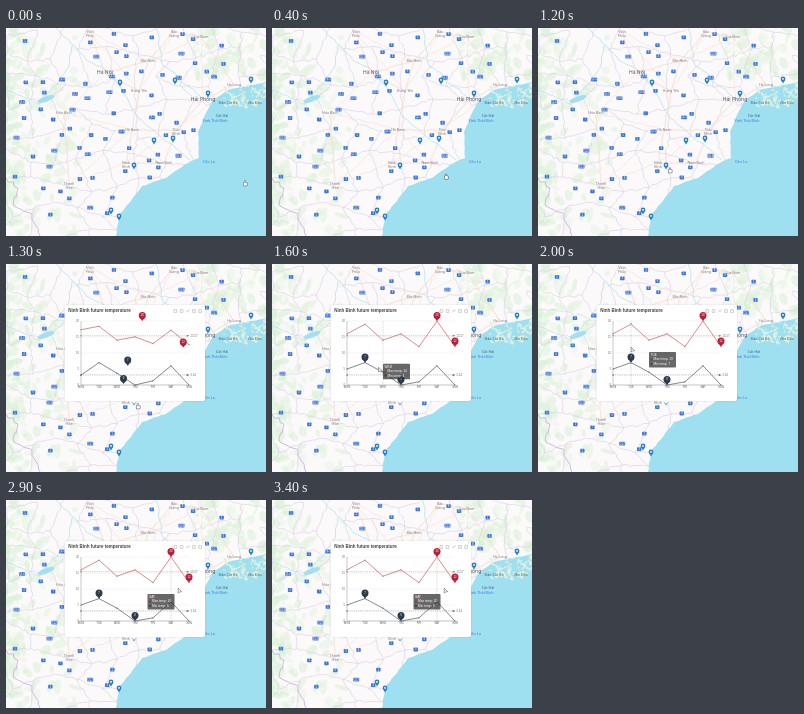
An HTML page with a canvas that plays this animation: 260x208 px, repeating every 3500 ms.

```html
<!DOCTYPE html>
<html lang="en">
<head>
<meta charset="utf-8">
<title>Temperature map</title>
<style>
html, body { margin: 0; width: 100%; height: 100%; overflow: hidden; background: #fff; }
canvas { display: block; width: 260px; height: 208px; }
</style>
</head>
<body>
<canvas id="stage"></canvas>
<script>
const W = 260, H = 208, LOOP = 3500, TICK = 100;
const OPEN = 1205, HOVER = 1500;
const FONT = '"Liberation Sans", Arial, sans-serif';
const MAP_FONT = '"Noto Sans", "Open Sans", sans-serif';
const RED = '#b9203a', DARK = '#2c3c4c';
const ratio = Math.max(1, window.devicePixelRatio || 1);

const sized = c => {
  c.width = W * ratio;
  c.height = H * ratio;
  const g = c.getContext('2d');
  g.scale(ratio, ratio);
  g.lineJoin = 'round';
  return g;
};
const ctx = sized(document.getElementById('stage'));
const mapCanvas = document.createElement('canvas');

let seed = 4711;
const rnd = () => (seed = (seed * 16807) % 2147483647) / 2147483647;
const spread = n => (rnd() - .5) * n;
const mix = (a, b, f) => a + (b - a) * f;
const clamp = v => Math.max(0, Math.min(1, v));

function trace(g, pts) {
  g.beginPath();
  pts.forEach(([x, y]) => g.lineTo(x, y));
}

function stroke(g, pts, color, width, dash = []) {
  trace(g, pts);
  g.strokeStyle = color;
  g.lineWidth = width;
  g.setLineDash(dash);
  g.stroke();
  g.setLineDash([]);
}

function fill(g, pts, color) {
  trace(g, pts);
  g.fillStyle = color;
  g.fill();
}

function oval(g, x, y, rx, ry, color, turn = 0) {
  g.beginPath();
  g.ellipse(x, y, rx, ry, turn, 0, 7);
  g.fillStyle = color;
  g.fill();
}
const disc = (g, x, y, r, color) => oval(g, x, y, r, r, color);

function box(g, x, y, w, h, r, color) {
  g.beginPath();
  g.roundRect(x, y, w, h, r);
  g.fillStyle = color;
  g.fill();
}

function text(g, str, x, y, size, color, align = 'left', font = FONT, weight = 400) {
  g.font = `${weight} ${size}px ${font}`;
  g.textAlign = align;
  g.textBaseline = 'middle';
  g.fillStyle = color;
  g.fillText(str, x, y);
}

// Adds jagged detail between the given points
function wander(pts, amount) {
  return pts.flatMap(([x, y], i) => {
    const [ex, ey] = pts[i + 1] || [x, y];
    const n = Math.max(1, Math.round(Math.hypot(ex - x, ey - y) / 4));
    return Array.from({ length: n }, (_, k) => [
      mix(x, ex, k / n) + (k ? spread(amount) : 0),
      mix(y, ey, k / n) + (k ? spread(amount) : 0)
    ]);
  });
}

const PLACES = [
  ['Hà Nội', 99, 45, 5], ['Hải Phòng', 197, 72, 5], ['Vĩnh|Phúc', 84, 4], ['Bắc|Giang', 168, 4],
  ['Lục Nam', 195, 9], ['Bắc Ninh', 142, 33], ['Hưng Yên', 133, 63], ['Hòa Bình', 58, 85],
  ['Hà Nam', 126, 102], ['Thái|Bình', 170, 102], ['Nam Định', 158, 135], ['Ninh|Bình', 120, 135],
  ['Thanh|Hóa', 63, 156], ['Hạ Long', 228, 57]
];
const SEA_LABELS = [['Đảo Cát Bà', 222, 75, '#46627c'], ['Vân Đồn', 249, 75, '#46627c'],
  ['Cát Hải', 216, 88, '#46627c'], ['Vịnh Thái Bình', 209, 93, '#3f7be0'], ['Cồn Lu', 203, 134, '#3f7be0']];
const PINS = [[245, 52], [169, 53], [202, 66], [114, 55], [148, 113], [167, 111], [128, 138], [105, 183], [113, 189]];
const COAST = [[260, 54], [222, 62], [208, 71], [199, 87], [192, 104], [193, 130], [178, 137],
  [160, 150], [136, 158], [125, 173], [113, 187], [110, 208]];

function mapPin(g, x, y) {
  fill(g, [[x - 2.1, y], [x + 2.1, y], [x, y + 3.6]], '#2a81c4');
  disc(g, x, y - 1.1, 2.4, '#2a81c4');
  disc(g, x, y - 1.1, .9, '#fff');
}

function shield(g, x, y) {
  const wide = rnd() < .3, w = wide ? 6 : 4.4;
  box(g, x - w / 2, y - 1.9, w, 3.8, .7, '#3f76dc');
  text(g, (wide ? 'QL' : '') + Math.ceil(rnd() * 9), x, y + .2, 2.8, '#fff', 'center');
}

function label(g, str, x, y, size, color) {
  str.split('|').forEach((line, i) => text(g, line, x, y + i * (size + .4), size, color, 'center', MAP_FONT));
}

function borders(g) {
  const step = 26, node = (c, r) => [c * step + Math.sin(c * 7 + r * 3) * 8, r * step + Math.cos(c * 5 + r * 8) * 8];
  for (let c = 0; c <= 10; c++) {
    for (let r = 0; r <= 8; r++) {
      [[c + 1, r], [c, r + 1]].forEach(([a, b]) => {
        if (rnd() < .75) stroke(g, wander([node(c, r), node(a, b)], 3), '#d3cfe2', .6);
      });
    }
  }
}

// Each town is joined to its nearest neighbours
function roads(g) {
  PLACES.forEach(([, x, y]) => {
    PLACES.map(([, a, b]) => [a, b, Math.hypot(a - x, b - y)])
      .sort((p, q) => p[2] - q[2]).slice(1, 4)
      .forEach(([a, b]) => stroke(g, wander([[x, y], [a, b]], 2), '#f5dfd2', .6));
  });
}

function drawMap(g) {
  g.fillStyle = '#fcf9fa';
  g.fillRect(0, 0, W, H);
  for (let i = 0; i < 330; i++) {
    const west = i < 250, f = rnd();
    const x = west ? f * f * 78 : 185 + f * 75, y = rnd() * (west ? H : 50);
    g.globalAlpha = .25 + rnd() * .4;
    oval(g, x, y, 2 + rnd() * 6, 1.5 + rnd() * 4, rnd() < .7 ? '#d8f1d6' : '#fbfcf8', rnd() * 3);
  }
  g.globalAlpha = 1;

  borders(g);
  roads(g);
  stroke(g, wander([[0, 150], [12, 160], [8, 178], [26, 186], [34, 208]], 4), '#c9b5dc', .9);
  [[[50, 0], [84, 34], [106, 46], [132, 90], [184, 132]], [[150, 0], [156, 35], [205, 78]], [[0, 62], [34, 76], [62, 40], [66, 18]]]
    .forEach(r => stroke(g, wander(r, 2.5), '#b5e2f2', .8));
  oval(g, 40, 71, 9, 2.6, '#a5def1', -.35);

  const coast = wander(COAST, 1);
  fill(g, [...coast, [W, H]], '#9edff0');
  for (let i = 0; i < 60; i++) {
    oval(g, 218 + rnd() * 42, 57 + rnd() * 22, .6 + rnd() * 2.4, .5 + rnd() * 1.5, '#dcefe0', rnd() * 3);
  }

  // Route shields on a loose grid, on land only
  for (let x = 14; x < 215; x += 18) {
    for (let y = 12; y < 200; y += 19) {
      const sx = x + spread(14), sy = y + spread(14);
      trace(g, [...coast, [W, H]]);
      const wet = g.isPointInPath((sx + 4) * ratio, (sy + 3) * ratio);
      if (!wet && rnd() < (x < 50 ? .4 : .75)) shield(g, sx, sy);
    }
  }

  PLACES.forEach(([s, x, y, big]) => label(g, s, x, y, big || 3.6, big ? '#504d58' : '#807b86'));
  SEA_LABELS.forEach(([s, x, y, color]) => label(g, s, x, y, 3.7, color));
  PINS.forEach(([x, y]) => mapPin(g, x, y));
}
drawMap(sized(mapCanvas));

const DAYS = ['MON', 'TUE', 'WED', 'THU', 'FRI', 'SAT', 'SUN'];
// Pins run from [day, value] to [day, value]
const SERIES = [
  { name: 'Max', line: '#c4615f', pin: RED, mean: '15.57', meanAt: 15.4,
    from: [20, 17, 14, 13, 15, 11, 14], to: [16, 19, 14, 16, 12, 20, 12],
    pins: [[0, 20, 5, 20], [5, 11, 6, 12]] },
  { name: 'Min', line: '#4d5861', pin: DARK, mean: '3.14', meanAt: 3.14,
    from: [-1, 7, 3, 0, 2, 6, 0], to: [5, 7, 4, 0, 1, 6, 0],
    pins: [[6, 4, 1, 7], [1, 1, 3, 0]] }
];
const px = day => 75 + day * 18;
const py = v => 121 - v * 3.2;

// Rows are [time, x, y]
function along(keys, t) {
  const n = keys.findIndex(k => k[0] > t);
  if (n < 1) return keys.at(n).slice(1);
  const a = keys[n - 1], b = keys[n], f = (t - a[0]) / (b[0] - a[0]);
  const e = f * f * (3 - 2 * f);
  return [mix(a[1], b[1], e), mix(a[2], b[2], e)];
}
const POINTER = [[0, 239, 155], [700, 132, 144], [1300, 132, 142], [1800, 94, 85],
  [2000, 94, 85], [2400, 156, 89], [2500, 156, 89], [2800, 173, 90]];
const TIP = [[1500, 111, 102], [1900, 111, 88], [2100, 111, 88], [2400, 111, 93], [2500, 111, 93], [2900, 141.5, 94]];

function chartPin(x, y, value, color) {
  const cy = y - 5.6;
  fill(ctx, [[x - 2.9, cy + 1.9], [x + 2.9, cy + 1.9], [x, y]], color);
  disc(ctx, x, cy, 3.5, color);
  text(ctx, value, x, cy + .1, 2.8, '#fff', 'center');
}

function toolbox() {
  ctx.strokeStyle = '#9a9a9a';
  ctx.lineWidth = .45;
  for (let i = 0; i < 5; i++) {
    const x = 168 + i * 6.2;
    if (i === 2) stroke(ctx, [[x, 48.4], [x + 1, 46.4], [x + 2, 47.3], [x + 3, 45.4]], '#9a9a9a', .45);
    else ctx.strokeRect(x, 45.6, 2.7, 2.8);
  }
}

function axes() {
  for (let v = 0; v <= 20; v += 5) {
    stroke(ctx, [[75, py(v)], [183, py(v)]], v ? '#e6e6e6' : '#666', .4);
    text(ctx, v, 73, py(v), 2.7, '#666', 'right');
  }
  stroke(ctx, [[75, 57], [75, 121]], '#777', .4);
  DAYS.forEach((d, i) => text(ctx, d, px(i), 123.7, 2.7, '#555', 'center'));
}

function drawSeries({ line, pin, mean, meanAt, from, to, pins }, f, day) {
  const y = py(meanAt);
  stroke(ctx, [[75, y], [183, y]], line, .4, [1.2, 1]);
  disc(ctx, 75, y, .7, line);
  fill(ctx, [[183.5, y], [180.7, y - 1], [180.7, y + 1]], line);
  text(ctx, mean, 184.3, y, 2.9, '#666');

  const pts = to.map((v, i) => [px(i), py(mix(from[i], v, f))]);
  stroke(ctx, pts, line, .7);
  pts.forEach(([x, y], i) => {
    const r = i === day ? 1.1 : .6;
    disc(ctx, x, y, r, line);
    disc(ctx, x, y, r - .4, '#fff');
  });
  pins.forEach(([d0, v0, d1, v1]) => chartPin(px(mix(d0, d1, f)), py(mix(v0, v1, f)), v1, pin));
}

function popup(t, day) {
  ctx.save();
  ctx.shadowColor = 'rgba(0,0,0,.2)';
  ctx.shadowBlur = 1.5 * ratio;
  box(ctx, 58.5, 41, 140.5, 96, 2, '#fff');
  ctx.restore();
  fill(ctx, [[124, 136], [132, 136], [128, 140]], '#fff');

  text(ctx, 'Ninh Binh future temperature', 62.3, 46.7, 4.5, '#444', 'left', FONT, 700);
  toolbox();
  text(ctx, '×', 196.6, 43.4, 3.4, '#bbb', 'center');
  axes();
  if (day >= 0) stroke(ctx, [[px(day), 57], [px(day), 121]], '#b5b5b5', .5, [1.2, .8]);
  const f = 1 - (1 - clamp((t - OPEN) / 300)) ** 3;
  SERIES.forEach(s => drawSeries(s, f, day));
}

function tooltip(t, day) {
  const [x, y] = along(TIP, t);
  box(ctx, x, y, 27, 15.5, .9, 'rgba(50,50,50,.74)');
  text(ctx, DAYS[day], x + 1.6, y + 3.1, 3.2, '#fff');
  SERIES.forEach(({ name, pin, to }, i) => {
    const ty = y + 7.6 + i * 4.4;
    disc(ctx, x + 2.5, ty, 1, pin);
    text(ctx, `${name} temp: ${to[day]}`, x + 4.5, ty, 3.2, '#fff');
  });
}

function pointer(x, y, hand) {
  if (hand) {
    box(ctx, x - 2, y - .8, 4.4, 4, 1.3, '#555');
    box(ctx, x - .9, y - 2.7, 1.8, 4, .9, '#555');
    box(ctx, x - 1.5, y - .3, 3.4, 3, 1, '#fff');
    box(ctx, x - .4, y - 2.2, .8, 3, .4, '#fff');
    return;
  }
  const arrow = [[x - .8, y - 1.8], [x - .8, y + 3], [x + .5, y + 2], [x + 2.7, y + 1.7], [x - .8, y - 1.8]];
  fill(ctx, arrow, '#fff');
  stroke(ctx, arrow, '#444', .5);
}

function draw(t) {
  const [x, y] = along(POINTER, t);
  ctx.drawImage(mapCanvas, 0, 0, W, H);
  if (t >= OPEN) {
    const day = t < HOVER ? -1 : Math.floor((x - 75) / 18 + .48);
    popup(t, day);
    if (day >= 0) tooltip(t, day);
  }
  pointer(x, y, t < HOVER);
}

const start = performance.now();
function frame(now) {
  const t = Math.max(0, now - start) % LOOP;
  draw(Math.floor(t / TICK) * TICK);
  requestAnimationFrame(frame);
}
draw(0);
requestAnimationFrame(frame);
</script>
</body>
</html>
```
